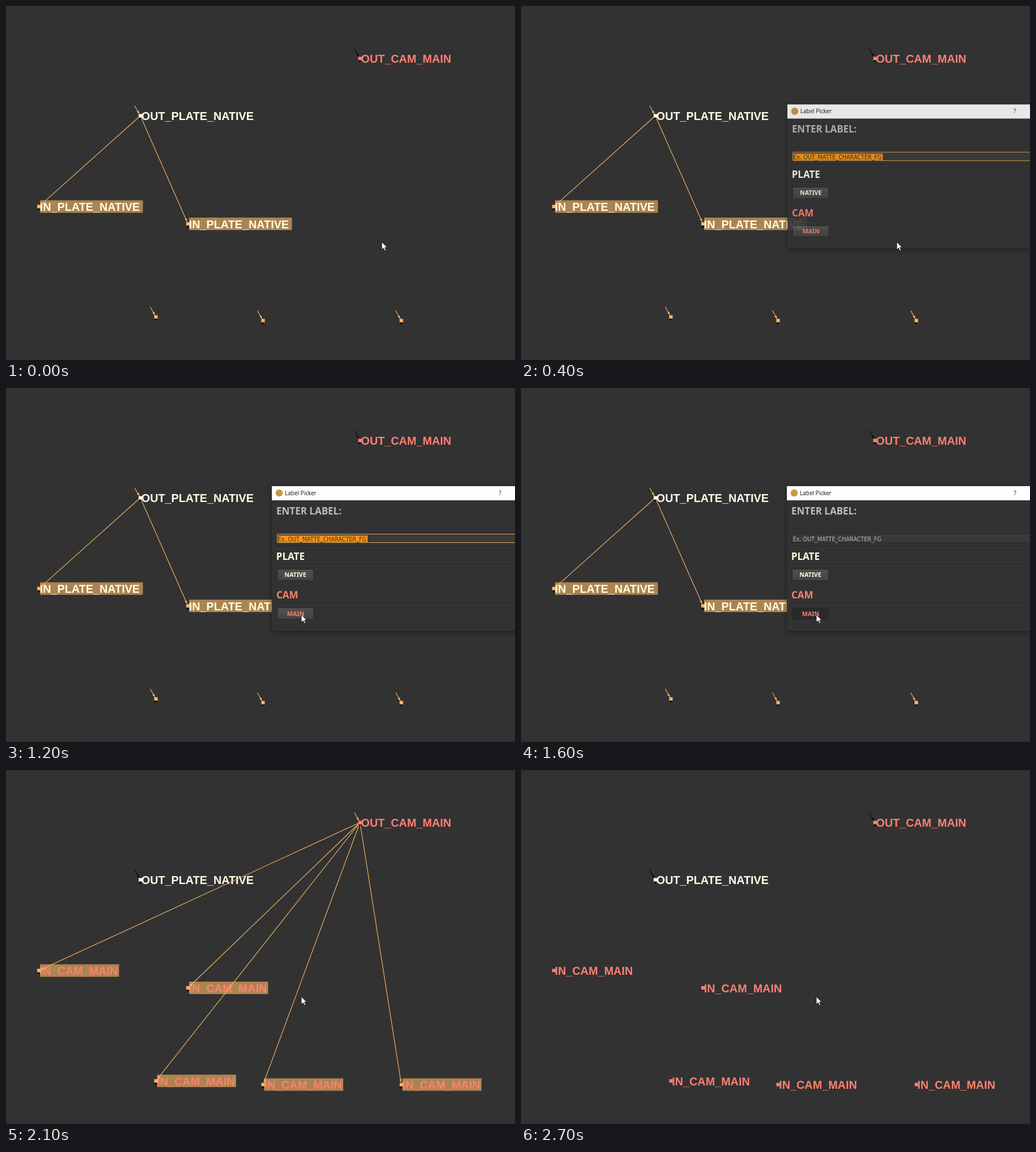
These frames come from a looping animation (898x624 px, 3 s). An HTML page:

```html
<!DOCTYPE html>
<html lang="en">
<head>
<meta charset="utf-8">
<title>Node label picker</title>
<style>
  html, body { margin: 0; width: 100%; height: 100%; overflow: hidden; background: #323233; }
  svg { display: block; width: 898px; height: 624px; }
  text { white-space: pre; }
  .label { font: bold 19.8px "Liberation Sans", Arial, sans-serif; }
  .head { font: bold 17px "Noto Sans", sans-serif; }
  .btn { font: bold 10.7px "Noto Sans", sans-serif; text-anchor: middle; }
  .title { font: 10px "Open Sans", sans-serif; }
  .entry { font: 9.65px "DejaVu Sans", sans-serif; }
  #dialog { filter: drop-shadow(0 2px 4px rgba(0, 0, 0, .42)); }
</style>
</head>
<body>
<svg viewBox="0 0 898 624">
  <defs>
    <linearGradient id="face" x2="0" y2="1">
      <stop stop-color="#50514f"/><stop offset="1" stop-color="#424342"/>
    </linearGradient>
  </defs>
  <rect width="898" height="624" fill="#323233"/>
  <rect y="623" width="898" height="1" fill="#29292a"/>
  <g id="plate"></g>
  <g id="cam"></g>
  <g id="done"></g>
  <g id="dialog"></g>
  <path id="pointer" d="M0 0V13.4L3.1 10.6L5.3 15.4L7.5 14.4L5.4 9.7H9.5Z"
        fill="#fff" stroke="#111" stroke-width=".8"/>
</svg>
<script>
const ORANGE = '#ffb860', IVORY = '#ffffe6', SALMON = '#ff8070', BLACK = '#080808';
const LOOP = 3000, STEP = 100;
const $ = id => document.getElementById(id);

const plateOut = [237, 193.5], camOut = [624.5, 92.5];
const inputs = [[58, 353.5], [321, 384], [264.5, 548], [453.5, 554.5], [697.5, 554.5]];

const rect = (x, y, w, h, fill, more = '') =>
  `<rect x="${x}" y="${y}" width="${w}" height="${h}" fill="${fill}" ${more}/>`;
const text = (cls, x, y, fill, str) =>
  `<text class="${cls}" x="${x}" y="${y}" fill="${fill}">${str}</text>`;
const label = ([x, y], str, fill) => text('label', x + 1.8, y + 7.7, fill, str);
const marked = ([x, y], str, fill, w) =>
  rect(x + 2, y - 11, w, 22, '#ac8450') + label([x, y], str, fill);
const dot = ([x, y], fill, tail = true) =>
  (tail ? rect(x - 2, y + 3, 3, 3.5, BLACK) : '') + rect(x - 3, y - 3, 6, 6, fill);

function arrow([x1, y1], [x2, y2], color, gap) {
  const a = Math.atan2(y2 - y1, x2 - x1);
  const ex = x2 - gap * Math.cos(a), ey = y2 - gap * Math.sin(a);
  return `<path d="M${x1} ${y1}L${ex} ${ey}" stroke="${color}" stroke-width="1.1"/>` +
    `<path d="M0 0L-5.5 -2V2Z" fill="${color}" transform="translate(${ex} ${ey}) rotate(${a * 180 / Math.PI})"/>`;
}
const stub = ([x, y], color) => arrow([x - 10, y - 17.5], [x, y], color, 3.8);
const links = (from, list) => list.map(p => arrow(from, p, ORANGE, 4)).join('');
const each = (list, fn) => list.map(p => fn(p)).join('');

const outLabels = label(plateOut, 'OUT_PLATE_NATIVE', IVORY) + label(camOut, 'OUT_CAM_MAIN', SALMON);
const outDots = dot(plateOut, IVORY) + dot(camOut, SALMON);
const wired = inputs.slice(0, 2), loose = inputs.slice(2);

$('plate').innerHTML = outLabels +
  each(wired, p => marked(p, 'IN_PLATE_NATIVE', IVORY, 181.5)) +
  links(plateOut, wired) + stub(plateOut, ORANGE) + stub(camOut, BLACK) +
  each(loose, p => stub(p, ORANGE)) +
  each(inputs, p => dot(p, ORANGE)) + outDots;

$('cam').innerHTML = outLabels +
  each(inputs, p => marked(p, 'IN_CAM_MAIN', SALMON, 139.5)) +
  links(camOut, inputs) + stub(camOut, ORANGE) + stub(plateOut, BLACK) +
  each(inputs, p => dot(p, ORANGE)) + outDots;

$('done').innerHTML = outLabels +
  each(inputs, p => label(p, 'IN_CAM_MAIN', SALMON)) +
  stub(camOut, BLACK) + stub(plateOut, BLACK) +
  each(inputs, p => dot(p, SALMON, false)) + outDots;

const rule = y => rect(478, y, 453, 1, '#1f1f20') + rect(478, y + 1, 453, 1, '#414142');
const button = (y, id) =>
  rect(478.5, y + .5, 64, 20, 'url(#face)', `id="${id}" rx="1.5" stroke="#272727"`);
const hint = 'Ex. OUT_MATTE_CHARACTER_FG';

$('dialog').innerHTML =
  rect(469, 173, 471, 255, '#323233') + rect(469, 173, 471, 25, '#fff') +
  '<circle cx="482" cy="185" r="6.3" fill="#c89a3c"/>' +
  text('title', 492, 189, '#111', 'Label Picker') +
  '<g id="help">' + text('title', 869.5, 189, '#111', '?') + '</g>' +
  text('head', 477, 223, '#bcbcbc', 'ENTER LABEL:') +
  rect(478.5, 257.5, 452, 15, '#3a3a3b', 'id="field" rx="1.5"') +
  rect(480, 260, 158, 11.5, '#f7941d', 'id="range"') +
  `<g id="hint">${text('entry', 479.5, 269.5, 'inherit', hint)}</g>` +
  rule(279) + text('head', 476.8, 303, IVORY, 'PLATE') + rule(311) +
  button(319, 'nativeBtn') + text('btn', 510.5, 333.2, IVORY, 'NATIVE') +
  text('head', 477, 371, SALMON, 'CAM') + rule(379) +
  button(387, 'mainBtn') + text('btn', 511, 401.7, SALMON, 'MAIN');

// [step, opacity, scale]
const fades = [[0, 0, 1], [3, .4, .975], [4, .89, .996], [5, 1, 1],
  [18, .92, .996], [19, .56, .983], [20, .14, .968], [21, 0, 1]];
// [step, x, y]
const moves = [[0, 663, 416], [6, 612, 417], [7, 538.5, 413.5], [8, 527, 408],
  [9, 518, 401], [10, 521, 399.5]];
const at = (table, step) => table.filter(row => row[0] <= step).pop();
const show = (id, on) => { $(id).style.display = on ? '' : 'none'; };

let last = -1;
function pose(step) {
  show('plate', step < 18);
  show('cam', step >= 18 && step < 24);
  show('done', step >= 24);

  const [, alpha, scale] = at(fades, step);
  const dialog = $('dialog');
  show('dialog', alpha > 0);
  dialog.setAttribute('opacity', alpha);
  dialog.setAttribute('transform', `translate(704 300) scale(${scale}) translate(-704 -300)`);

  const focused = step < 16, pressed = step === 16 || step === 17;
  show('range', focused);
  show('help', step < 19);
  $('field').setAttribute('stroke', focused ? '#e3a64e' : '#29292a');
  $('hint').querySelector('text').setAttribute('fill', focused ? '#45300f' : '#b9b9b9');
  $('mainBtn').setAttribute('fill', pressed ? '#292929' : 'url(#face)');

  const [, x, y] = at(moves, step);
  $('pointer').setAttribute('transform', `translate(${x} ${y})`);
}

const start = performance.now();
function tick() {
  const step = Math.floor(((performance.now() - start) % LOOP) / STEP);
  if (step !== last) pose(last = step);
  requestAnimationFrame(tick);
}
tick();
</script>
</body>
</html>
```
